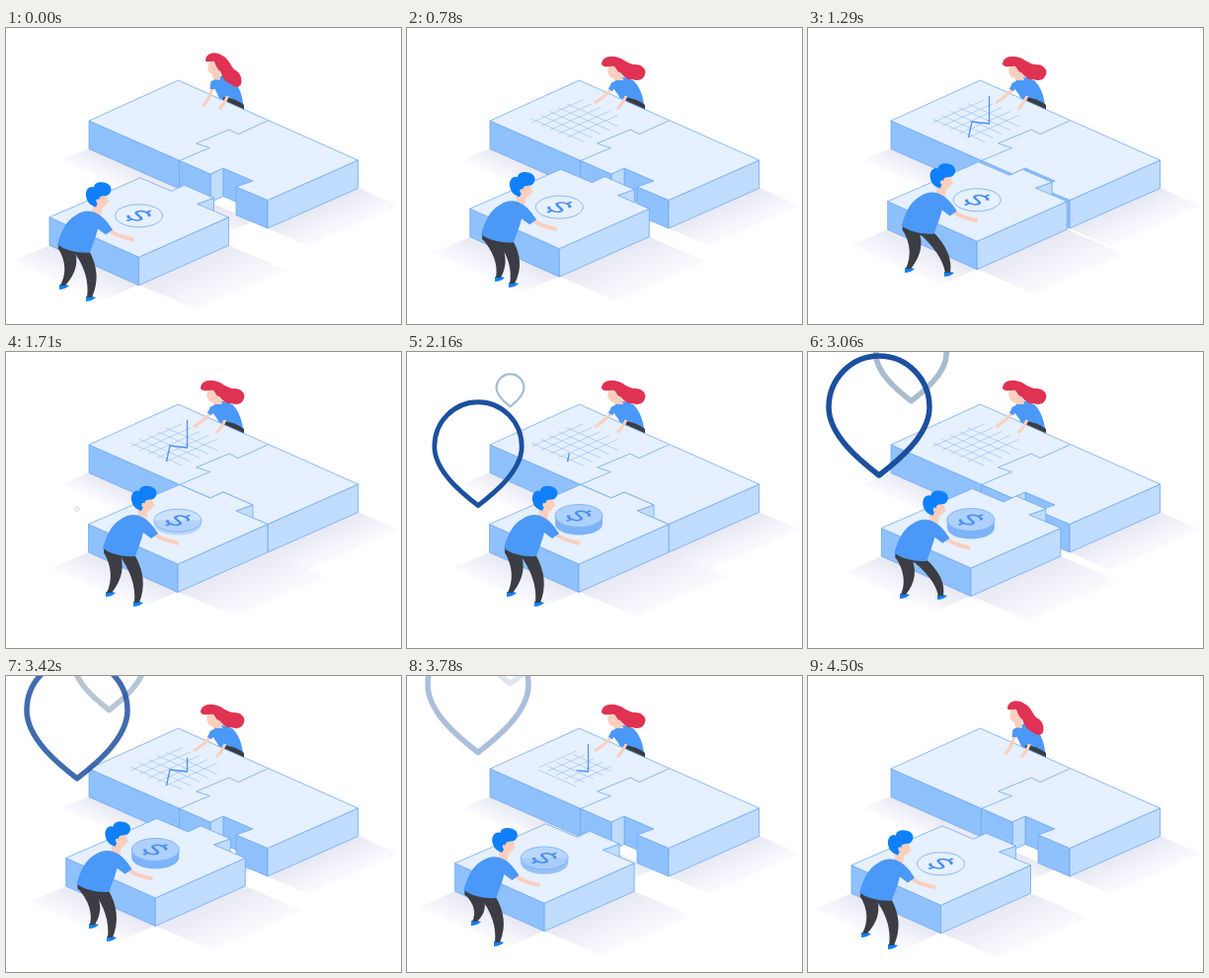
An HTML page with a canvas for the animation above (4530 ms loop, 400 px wide and 300 px high).

```html
<!DOCTYPE html>
<html lang="en">
<head>
<meta charset="utf-8">
<title>Puzzle teamwork</title>
<style>
  html, body { margin: 0; width: 100%; height: 100%; overflow: hidden; background: #fff; }
  canvas { display: block; }
</style>
</head>
<body>
<canvas id="stage" width="400" height="300"></canvas>
<script>
const ctx = document.getElementById('stage').getContext('2d');
const LOOP = 4530, HEIGHT = 28.5;
const TOP = '#e6f0fe', LEFT = '#8fc1fd', RIGHT = '#c0dcff', EDGE = '#6faaf3';
const SHIRT = '#4a98f8', PANTS = '#3b3d43', SKIN = '#fbcfbd', HAIR = '#e03252', BLUE = '#0f80fa';

const clamp = x => Math.max(0, Math.min(1, x));
const lerp = (a, b, k) => a + (b - a) * k;
const linear = (t, a, b) => clamp((t - a) / (b - a));
const ease = (t, a, b) => .5 - .5 * Math.cos(Math.PI * linear(t, a, b));

// Blends two paths that share the same commands.
function morph(from, to, k) {
  const target = to.match(/-?[\d.]+/g);
  let i = 0;
  return from.replace(/-?[\d.]+/g, n => lerp(+n, +target[i++], k).toFixed(2));
}

function shape(d, fill, stroke, width = .8) {
  const path = new Path2D(d);
  if (fill) { ctx.fillStyle = fill; ctx.fill(path); }
  if (stroke) { ctx.strokeStyle = stroke; ctx.lineWidth = width; ctx.stroke(path); }
}

function ellipse(x, y, rx, ry, fill, stroke, width = 1, angle = 0) {
  ctx.beginPath();
  ctx.ellipse(x, y, rx, ry, angle, 0, 7);
  if (fill) { ctx.fillStyle = fill; ctx.fill(); }
  if (stroke) { ctx.strokeStyle = stroke; ctx.lineWidth = width; ctx.stroke(); }
}

function at(x, y, draw) {
  ctx.save();
  ctx.translate(x, y);
  draw();
  ctx.restore();
}

const wall = (x1, y1, x2, y2, fill) =>
  shape(`M${x1},${y1}L${x2},${y2}V${y2 + HEIGHT}L${x1},${y1 + HEIGHT}Z`, fill, EDGE);

// Casts the base line of a wall by (dx, dy), fading away from the wall.
function shadow(x1, y1, x2, y2, dx, dy) {
  const nx = y1 - y2, ny = x2 - x1;
  const reach = (dx * nx + dy * ny) / (nx * nx + ny * ny);
  const fade = ctx.createLinearGradient(x1, y1, x1 + nx * reach, y1 + ny * reach);
  fade.addColorStop(0, '#e8e8f4');
  fade.addColorStop(1, '#fbfbfe');
  shape(`M${x1},${y1}L${x2},${y2}l${dx},${dy}L${x1 + dx},${y1 + dy}Z`, fade);
}

function fixedBlocks() {
  wall(220, 142, 250, 155, LEFT);
  wall(207, 148, 220, 142, RIGHT);
  wall(84, 94, 175.5, 134.5, LEFT);
  wall(175.5, 134.5, 207, 148, LEFT);
  wall(233, 161, 265, 174.5, LEFT);
  wall(265, 174.5, 356.5, 134, RIGHT);
  shape('M84,94L174.5,53L356.5,134L265,174.5L233,161L250,155L220,142L207,148Z', TOP, EDGE);
  shape('M265,94L235,107.6L226,103L192.5,117L206.5,121.5L175.5,134.5', null, EDGE);
}

function movingBlock() {
  wall(250, 155, 233, 161, RIGHT);
  wall(83.5, 174.5, 174, 215, LEFT);
  wall(174, 215, 265, 174.5, RIGHT);
  shape('M175.5,134.5L207,148L220,142L250,155L233,161L265,174.5L174,215L83.5,174.5Z', TOP, EDGE);
}

function grid(t) {
  const half = 26 * (ease(t, 200, 720) - ease(t, 3500, 4300));
  if (half < .1) return;
  ctx.save();
  ctx.transform(1, -.44, 1, .44, 174.5, 94);
  ctx.beginPath();
  for (let p = -22; p <= 22; p += 8.8) {
    ctx.moveTo(p, -half); ctx.lineTo(p, half);
    ctx.moveTo(-half, p); ctx.lineTo(half, p);
  }
  ctx.restore();
  ctx.strokeStyle = '#a6c9f6';
  ctx.lineWidth = .8;
  ctx.stroke();
}

function chart(t) {
  const length = 63;
  const end = t < 2700 ? ease(t, 850, 1250) - ease(t, 1750, 2290) : ease(t, 3150, 3550);
  const start = ease(t, 3600, 4050);
  if (end - start < .01) return;
  ctx.setLineDash([length * (end - start), 200]);
  ctx.lineDashOffset = -length * start;
  shape('M162.5,111L166,95L183.5,97L183.5,69', null, '#4f93ea', 1.3);
  ctx.setLineDash([]);
}

function coin(t) {
  const lift = 7 * (ease(t, 1500, 2050) - ease(t, 3450, 4150));
  const solid = clamp(lift / 5);
  if (solid) {
    ctx.globalAlpha = solid;
    shape(`M150,${173 - lift}V174A24,11.5 0 0 0 198,174V${173 - lift}Z`, '#7db3f8');
    ellipse(174, 173 - lift, 24, 11.5, '#aed0fd');
    ctx.globalAlpha = 1;
  }
  ellipse(174, 173 - lift, 24, 11.5, null, '#7fb3f5', .9);
  ctx.save();
  ctx.transform(1.1, .48, -1.1, .48, 174, 173 - lift);
  shape('M5,-4C4,-8 -5,-8 -5,-3.5C-5,1 5,-1 5,3.5C5,8 -4,8 -5,4M0,-7V-11M0,7V11', null, '#4a90ec', 2);
  ctx.restore();
}

function womanBody(k) {
  shape(morph('M208,54L219,48L231,53Q240,64 241,85L222,85L215,69Z',
              'M206,57L217,49L229,53Q239,62 241,85L222,85L214,68Z', k), SHIRT);
  shape('M220,70Q232,71 241,78V88H220Z', PANTS);
  shape(morph('M208,42L216,41L217,53L210,52Z', 'M209,44L217,43L219,53L210,53Z', k), SKIN);
  ellipse(lerp(209, 208, k), lerp(40, 44.5, k), 4.6, 6.6, SKIN, null, 1, lerp(0, -.3, k));
  shape(morph(
    'M202,33C202,25 213,23 219,28C226,31 227,38 231,42C236,44 240,50 238,57C236,61 229,60 226,56C221,54 219,49 217,44C214,42 213,39 211,34C208,33 204,36 202,33Z',
    'M197,37C197,29 206,27 214,30C219,31 224,37 231,37C238,37 243,42 241,47C239,53 234,54 228,52C222,53 219,48 216,45C213,45 212,41 210,39C206,38 200,41 197,37Z', k), HAIR);
}

function womanArms(k) {
  shape(morph('M209,59Q208,69 200,79', 'M208,60Q203,68 190,76', k), null, SKIN, 3);
  shape(morph('M225,65Q224,74 216,82', 'M223,65Q221,74 213,82', k), null, SKIN, 3);
  shape(morph('M210,54L209,62', 'M210,56L206,63', k), null, SHIRT, 5);
  shape(morph('M226,57L225,69', 'M225,57L222,69', k), null, SHIRT, 6);
}

// Each step: time, left foot x y, right foot x y.
const STEPS = [
  [0, 58, 262, 85, 274], [400, 66, 258, 91, 271], [780, 93, 254, 107, 260],
  [1290, 102, 245, 142, 249], [1560, 105, 245, 133, 255], [2500, 105, 245, 133, 255],
  [3060, 97, 247, 135, 248], [3420, 88, 253, 106, 266], [3780, 69, 250, 92, 271],
  [4200, 58, 262, 85, 274], [LOOP, 58, 262, 85, 274]
];

function feet(t) {
  const i = STEPS.findIndex(s => s[0] > t);
  const a = STEPS[i - 1], b = STEPS[i];
  return a.map((v, n) => lerp(v, b[n], ease(t, a[0], b[0])));
}

function leg(hipX, hipY, x, y) {
  const kneeX = (hipX + x) / 2 + 10, kneeY = (hipY + y) / 2;
  shape(`M${x - 4},${y - 2}L${x + 2},${y - 2}L${x + 6},${y - 1}Q${x + 2},${y + 3} ${x - 4},${y + 3}Z`, BLUE);
  shape(`M${hipX - 8},${hipY}Q${kneeX - 5},${kneeY} ${x - 3},${y - 1}H${x + 2}Q${kneeX + 7},${kneeY} ${hipX + 8},${hipY}Z`, PANTS);
}

function man(t, away) {
  const dx = -46 * away, dy = 20.5 * away;
  const [, ax, ay, bx, by] = feet(t);
  at(dx, dy, () => {
    leg(107, 203, ax - dx, ay - dy);
    leg(122, 205, bx - dx, by - dy);
    shape('M99,198L131,203L130,208Q112,210 99,204Z', PANTS);
    shape('M147,182Q156,189 164,191L175,194', null, SKIN, 4);
    shape('M134,157L144,159L142,170L133,168Z', SKIN);
    shape('M98,199C102,186 106,175 117,169C124,164 133,164 139,168C146,172 150,178 154,184L147,189L139,183C137,192 133,200 131,207C120,208 106,205 98,199Z', SHIRT);
    ellipse(143.5, 154.5, 5.6, 7, SKIN, null, 1, .2);
    shape('M147,152L151,156L147,158Z', SKIN);
    shape('M127,150C126,143 131,139 135,141C135,135 146,134 151,139C154,143 152,147 149,149C146,150 143,149 141,151C140,155 139,157 137,161C131,159 128,156 127,150Z', BLUE);
    ellipse(139, 155, 1.7, 2.3, SKIN);
  });
}

function pin(x, tip, scale, alpha, color, width) {
  if (scale <= 0 || alpha <= 0) return;
  ctx.save();
  ctx.globalAlpha = alpha;
  if (alpha < 1) ctx.filter = `blur(${(1 - alpha).toFixed(2)}px)`;
  ctx.translate(x, tip);
  ctx.scale(scale, scale);
  shape('M0,-4C-18,-18 -51,-44 -51,-73A51,52 0 0 1 51,-73C51,-44 18,-18 0,-4Z', null, color, width);
  ctx.restore();
}

function pins(t) {
  const rise = Math.max(0, t - 1780) / 1000;
  const smallRise = Math.max(0, t - 2760) / 1000;
  const fade = 1 - linear(t, 3300, 4060);
  pin(104.5, 56.5 - 44 * smallRise * smallRise, .7 * ease(t, 1800, 2640), fade, '#a9bccd', 8);
  pin(72, 162 - 20.1 * rise * rise, ease(t, 1620, 2330), fade, '#1c4f9f', 5.5);
}

function frame(now) {
  const t = now % LOOP;
  const away = 1 - ease(t, 0, 1560) + ease(t, 2560, 4130);
  const lean = ease(t, 0, 750) - ease(t, 3820, 4500);
  const dx = -39.5 * away, dy = 17.3 * away;

  ctx.fillStyle = '#fff';
  ctx.fillRect(0, 0, 400, 300);
  ctx.lineJoin = 'round';
  ctx.lineCap = 'butt';

  shadow(84, 122, 250, 196, -28, 12);
  shadow(265, 203, 356.5, 162, 41, 18);
  at(dx, dy, () => {
    shadow(83.5, 203, 174, 243, -37, 16);
    shadow(174, 243, 265, 203, 58, 25);
  });

  womanBody(lean);
  fixedBlocks();
  grid(t);
  chart(t);
  womanArms(lean);
  at(dx, dy, () => { movingBlock(); coin(t); });
  man(t, away);
  pins(t);
  requestAnimationFrame(() => frame(performance.now()));
}
frame(performance.now());
</script>
</body>
</html>
```
